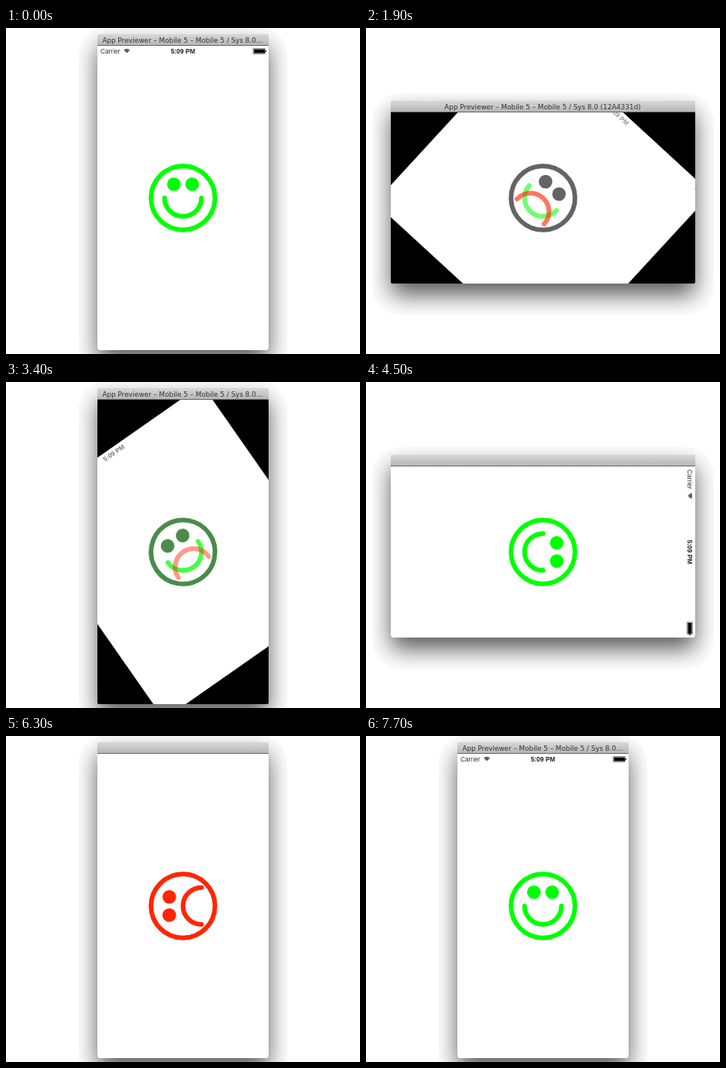
Animation of 457x421 px, one loop 8000 ms. Source, as an HTML page with a canvas:

```html
<!DOCTYPE html>
<html lang="en">
<head>
<meta charset="utf-8">
<title>Rotating mood</title>
<style>
  html, body { margin: 0; width: 100%; height: 100%; overflow: hidden; background: #fff; }
  canvas { display: block; }
</style>
</head>
<body>
<canvas id="stage" width="457" height="421"></canvas>
<script>
const ctx = document.getElementById('stage').getContext('2d');
const LOOP = 8000, STEP = 100, TURN = 400;
const SHORT = 221, LONG = 393, CX = 228.5, CY = 219.5;
const GREEN = [0, 255, 0], GRAY = [100, 100, 100], RED = [255, 38, 0];
const NAME = 'App Previewer – Mobile 5 – Mobile 5 / Sys 8.0';

// The window switches shape at `from`; its content turns upright from `spin` on.
const turns = [
  { from: 1600, spin: 1693, landscape: true, blank: true },
  { from: 3100, spin: 3170, landscape: false, blank: true },
  { from: 4400, spin: 4500, landscape: true, blank: true },
  { from: 6300, spin: 6370, landscape: false, blank: false }
];
const resting = { from: -LOOP, spin: -LOOP, landscape: false, blank: false };

const clamp = v => Math.max(0, Math.min(1, v));
const lerp = (a, b, k) => a + (b - a) * k;
const ease = u => u * u * (3 - 2 * u);
const rgb = c => `rgb(${c.map(Math.round).join()})`;
const mix = (a, b, k) => rgb(a.map((v, i) => lerp(v, b[i], k)));

function write(text, x, y, font, color, align = 'center') {
  ctx.font = font;
  ctx.fillStyle = color;
  ctx.textAlign = align;
  ctx.fillText(text, x, y);
}

function drawWindow(x, y, w, h, title) {
  ctx.save();
  ctx.beginPath();
  ctx.roundRect(x - 24, y - 25, w + 48, h + 66, 36);
  ctx.clip();
  ctx.shadowColor = 'rgba(0,0,0,.65)';
  ctx.shadowBlur = 30;
  ctx.shadowOffsetY = 15;
  ctx.fillStyle = '#bbb';
  ctx.beginPath();
  ctx.roundRect(x, y - 15, w, h + 15, [3, 3, 2, 2]);
  ctx.fill();
  ctx.restore();

  const bar = ctx.createLinearGradient(0, y - 15, 0, y);
  bar.addColorStop(0, '#d8d8d8');
  bar.addColorStop(1, '#b4b4b4');
  ctx.fillStyle = bar;
  ctx.beginPath();
  ctx.roundRect(x, y - 15, w, 15, [3, 3, 0, 0]);
  ctx.fill();
  ctx.fillStyle = '#666';
  ctx.fillRect(x, y - 1, w, 1);
  if (title) write(title, CX - 0.5, y - 4.5, '8.8px "DejaVu Sans", sans-serif', '#333');
}

function drawStatus(w, h, alpha) {
  ctx.save();
  ctx.globalAlpha = alpha;
  ctx.translate(0, -h / 2);
  write('Carrier', 4 - w / 2, 10, '8.3px "Liberation Sans", Arial, sans-serif', '#333', 'left');
  write('5:09 PM', 0, 10, 'bold 8.4px "Liberation Sans", Arial, sans-serif', '#222');
  ctx.strokeStyle = ctx.fillStyle = '#000';
  ctx.lineWidth = 1.2;
  for (const r of [0.8, 2.8, 4.8]) {
    ctx.beginPath();
    ctx.arc(38 - w / 2, 9.5, r, -Math.PI * 0.75, -Math.PI * 0.25);
    ctx.stroke();
  }
  ctx.fillRect(w / 2 - 19, 4.5, 14, 5);
  ctx.fillRect(w / 2 - 4, 6, 1, 2);
  ctx.lineWidth = 0.5;
  ctx.strokeRect(w / 2 - 20, 3.8, 15.6, 6.4);
  ctx.restore();
}

function drawMouth(y, smiling, color, alpha) {
  ctx.globalAlpha = alpha;
  ctx.strokeStyle = color;
  ctx.beginPath();
  ctx.arc(0, y, 23.8, 0, Math.PI, !smiling);
  ctx.stroke();
  ctx.globalAlpha = 1;
}

function drawFace(joy) {
  const mid = 0.475;
  const tone = joy < mid ? mix(RED, GRAY, joy / mid) : mix(GRAY, GREEN, (joy - mid) / (1 - mid));
  ctx.strokeStyle = ctx.fillStyle = tone;
  ctx.lineWidth = 6;
  ctx.lineCap = 'round';
  ctx.beginPath();
  ctx.arc(0, 0, 41.3, 0, Math.PI * 2);
  ctx.stroke();
  for (const x of [-11.8, 11.8]) {
    ctx.beginPath();
    ctx.arc(x, -17.7, 8.8, 0, Math.PI * 2);
    ctx.fill();
  }
  drawMouth(0, true, rgb(GREEN), clamp(joy * 1.2));
  drawMouth(23.8, false, rgb(RED), clamp((1 - joy) * 1.2));
  ctx.lineCap = 'butt';
}

function draw(t) {
  ctx.fillStyle = '#fff';
  ctx.fillRect(0, 0, 457, 421);
  const turn = turns.findLast(s => t >= s.from) || resting;
  if (turn.blank && t < turn.from + STEP) return;

  const { landscape } = turn;
  const p = ease(clamp((t - turn.spin) / TURN));
  const [w, h] = landscape ? [LONG, SHORT] : [SHORT, LONG];
  const x = CX - w / 2, y = CY - h / 2;
  const title = p > 0.03 && NAME + (landscape ? ' (12A4331d)' : '…');
  drawWindow(x, y, w, h, title);

  ctx.save();
  ctx.beginPath();
  ctx.roundRect(x, y, w, h, [0, 0, 2, 2]);
  ctx.clip();
  ctx.fillStyle = '#000';
  ctx.fillRect(x, y, w, h);
  ctx.translate(CX, CY);
  ctx.rotate((landscape ? 1 : -1) * (1 - p) * Math.PI / 2);
  const viewW = lerp(h, w, p), viewH = lerp(w, h, p);
  const joy = landscape ? 1 - p : p;
  ctx.fillStyle = '#fff';
  ctx.fillRect(-viewW / 2, -viewH / 2, viewW, viewH);
  drawStatus(viewW, viewH, joy);
  drawFace(joy);
  ctx.restore();
}

const begin = performance.now();
function tick() {
  const t = (performance.now() - begin) % LOOP;
  draw(Math.floor(t / STEP) * STEP);
  requestAnimationFrame(tick);
}
tick();
</script>
</body>
</html>
```
